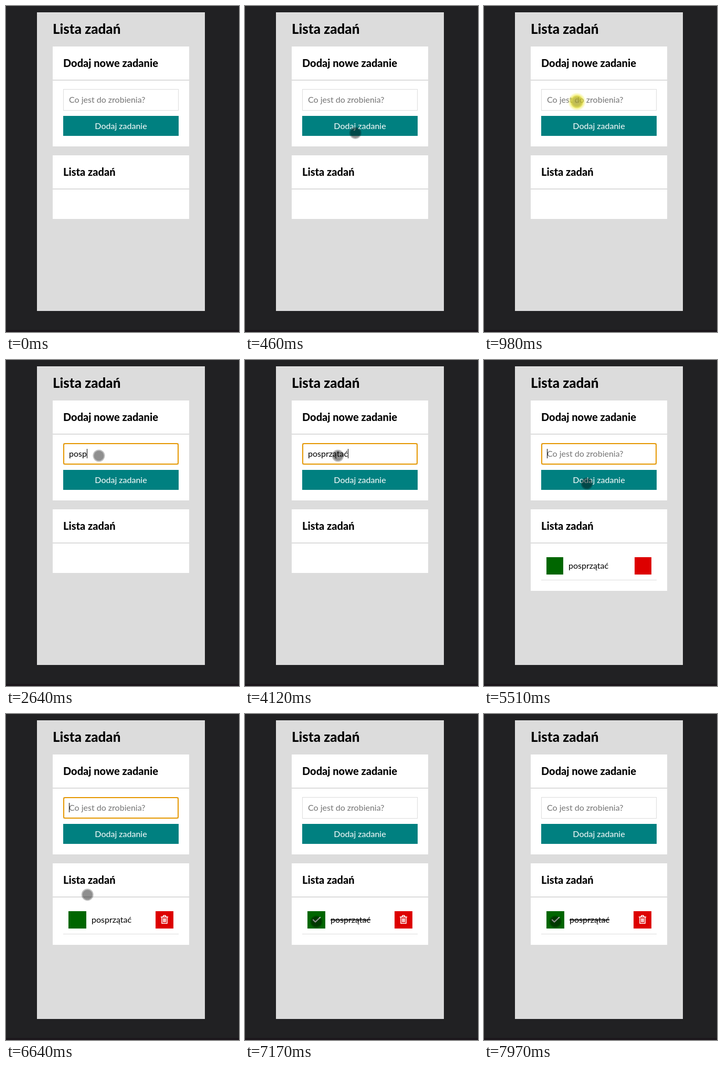
Recreate the animation shown at these times as an HTML page. Size 444 by 620 pixels, loop 8 s.

```html
<!DOCTYPE html>
<html lang="pl">
<head>
<meta charset="utf-8">
<style>
  html, body { margin: 0; width: 100%; height: 100%; overflow: hidden; background: #212123; }
  svg { display: block; }
  text { font: 16px Lato, sans-serif; white-space: pre; }
  .h1 { font-size: 26px; font-weight: 800; }
  .h2 { font-size: 20px; font-weight: 800; }
  .icon { fill: none; stroke: #fff; stroke-linecap: round; stroke-linejoin: round; }
</style>
</head>
<body>
<svg width="444" height="620" viewBox="0 0 444 620">
  <defs>
    <radialGradient id="yellow">
      <stop offset="0" stop-color="#e0d830" stop-opacity=".5"/>
      <stop offset=".62" stop-color="#e8e228" stop-opacity=".7"/>
      <stop offset="1" stop-color="#f5f050" stop-opacity="0"/>
    </radialGradient>
  </defs>
  <rect width="444" height="620" fill="#212123"/>
  <rect y="616" width="444" height="4" fill="#1c171c"/>
  <rect x="59" y="12" width="320" height="568" fill="#dcdcdc"/>
  <text class="h1" x="89" y="53">Lista zadań</text>

  <rect x="89" y="77" width="260" height="190" fill="#fff"/>
  <text class="h2" x="109" y="116">Dodaj nowe zadanie</text>
  <rect x="89" y="140" width="260" height="2" fill="#dcdcdc"/>
  <rect x="109.5" y="158.5" width="219" height="40" fill="#fff" stroke="#dcdcdc"/>
  <rect id="focus" x="110" y="159" width="218" height="39" rx="2.5" fill="#fff" stroke="#e59700" stroke-width="2"/>
  <text id="hint" x="120" y="184" fill="#757575">Co jest do zrobienia?</text>
  <text id="typed" x="120" y="184"></text>
  <rect id="caret" y="169" width="1" height="18"/>
  <rect x="109" y="209" width="220" height="38" fill="teal"/>
  <text x="219" y="234" fill="#fff" text-anchor="middle">Dodaj zadanie</text>

  <rect id="card" x="89" y="284" width="260" fill="#fff"/>
  <text class="h2" x="109" y="323">Lista zadań</text>
  <rect x="89" y="347" width="260" height="2" fill="#dcdcdc"/>
  <g id="item">
    <rect id="done" x="119" y="375" height="33" fill="#060"/>
    <path id="check" class="icon" stroke-width="2.4" d="M130 391.5l4 4 9-8.5"/>
    <text id="task" y="397">posprzątać</text>
    <rect id="remove" y="375" height="33" fill="#d00"/>
    <path id="trash" class="icon" stroke-width="1.6"
      d="M295.5 386h13m-9.5 0l1-2.6h4l1 2.6m-8 0v12.3h10v-12.3m-7.1 3v6.5m2.1 0v-6.5m2.1 0v6.5"/>
    <rect x="109" y="418" width="220" height="1" fill="#dcdcdc"/>
  </g>

  <g id="pointer">
    <circle r="11.5" fill-opacity=".25"/>
    <circle r="9.5" fill-opacity=".25"/>
    <circle id="glow" r="17.5" fill="url(#yellow)"/>
  </g>
</svg>
<script>
const LOOP = 8000, STEP = 66, BLINK = 530, PRESS = 75;
const WORD = 'posprzątać', TYPING = 1980, ICONS = 5650;
const ENTRY = { x: 385, y: 553 };
// The pointer travels to each place, then clicks it
const FIELD = { from: 130, to: 650, x: 177, y: 182, click: 1050 };
const ADD = { from: 4914, to: 5310, x: 196, y: 235, click: 5510 };
const DONE = { from: 6375, to: 6930, x: 136, y: 395, click: 7170 };
const MOVES = [FIELD, ADD, DONE];

// Accented letters need a second key, so they take longer
let keyTime = TYPING - 195;
const KEYS = [...WORD].map(c => keyTime += c > 'z' ? 385 : 195);

const $ = id => document.getElementById(id);
const show = (id, on) => { $(id).style.display = on ? '' : 'none'; };
const set = (id, attrs) => {
  for (const name in attrs) $(id).setAttribute(name, attrs[name]);
};

function pointerAt(t) {
  let { x, y } = ENTRY;
  for (const m of MOVES) {
    const elapsed = Math.max(0, Math.floor((t - m.from) / STEP) * STEP);
    const k = Math.sin(Math.min(1, elapsed / (m.to - m.from)) * Math.PI / 2);
    x += (m.x - x) * k;
    y += (m.y - y) * k;
  }
  return [x, y];
}

function drawField(t) {
  const focused = t >= FIELD.click && t < DONE.click;
  const count = t < ADD.click ? KEYS.filter(k => k <= t).length : 0;
  const lastInput = t >= ADD.click ? ADD.click : count ? KEYS[count - 1] : FIELD.click;
  $('typed').textContent = WORD.slice(0, count);
  show('focus', focused);
  show('hint', !count);
  show('caret', focused && (t - lastInput) % (2 * BLINK) < BLINK);
  set('caret', { x: 120 + (count ? Math.round($('typed').getComputedTextLength()) : 0) });
}

function drawList(t) {
  const added = t >= ADD.click, ready = t >= ICONS, done = t >= DONE.click;
  const size = ready ? 34 : 32;
  set('card', { height: added ? 155 : 121 });
  show('item', added);
  set('done', { width: size });
  set('remove', { x: 319 - size, width: size });
  set('task', { x: 129 + size, 'text-decoration': done ? 'line-through' : 'none' });
  show('trash', ready);
  show('check', done);
}

function drawPointer(t) {
  show('pointer', t >= FIELD.from);
  set('pointer', { transform: `translate(${pointerAt(t)})` });
  show('glow', MOVES.some(m => t >= m.click - PRESS && t < m.click));
}

const start = performance.now();
function draw(now) {
  const t = Math.max(0, now - start) % LOOP;
  drawField(t);
  drawList(t);
  drawPointer(t);
  requestAnimationFrame(draw);
}
draw(start);
</script>
</body>
</html>
```
